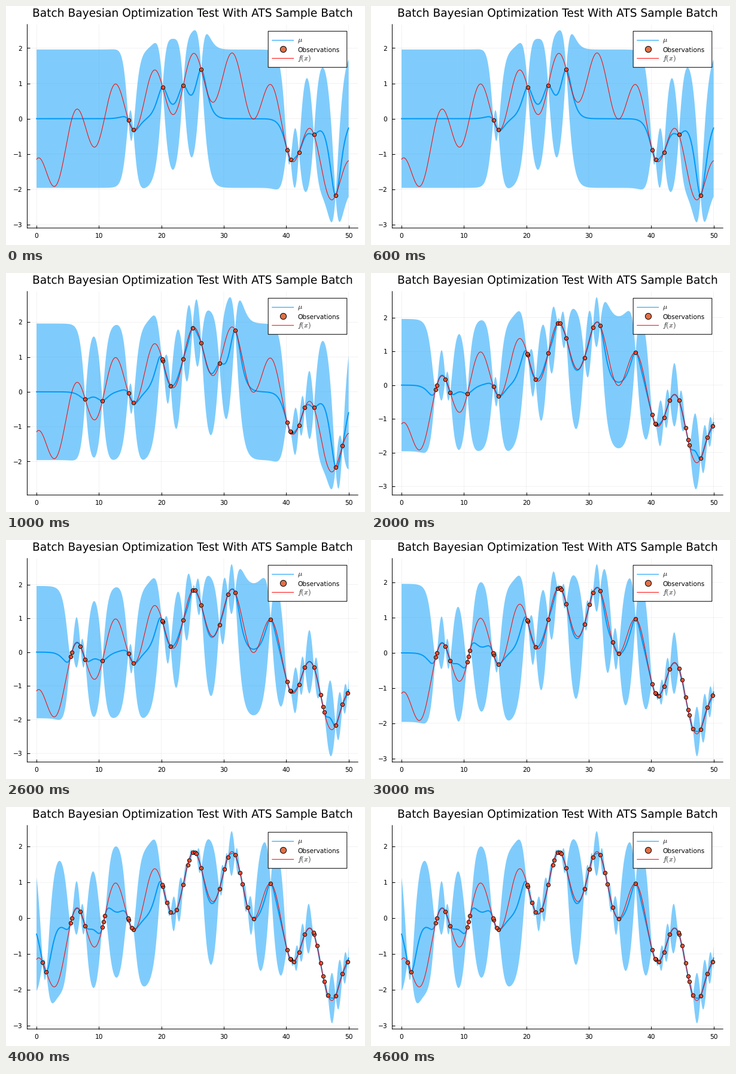
Animation, 600 px wide and 400 px high, one loop 5 s. Source, as a matplotlib script:

```python
import numpy as np
import matplotlib.pyplot as plt
from matplotlib.animation import FuncAnimation
from matplotlib.patches import Rectangle

W, H = 600, 400
PT = 0.72  # points per pixel at 100 dpi
LEFT, RIGHT, TOP, BOTTOM = 35.47, 588.19, 30.87, 371.61
BLUE, ORANGE = "#009AFA", "#E26F46"

plt.rcParams.update({
    "font.family": "DejaVu Sans",
    "font.size": 10.67 * PT,
    "mathtext.fontset": "cm",
    "text.hinting": "none",
})

# Sample locations chosen at each step
BATCHES = [
    [14.72, 15.50, 20.20, 23.50, 26.39, 40.15, 40.70, 42.04, 44.44, 47.92],
    [7.80, 10.55, 20.13, 21.48, 25.00, 29.29, 31.82, 40.65, 42.99, 49.03],
    [5.47, 5.66, 7.03, 25.39, 30.67, 37.51, 45.50, 45.90, 46.09, 49.84],
    [10.74, 10.94, 14.64, 25.58, 30.09, 33.81, 34.77, 41.23, 44.93, 46.69],
    [0.98, 1.57, 15.24, 20.90, 22.44, 24.21, 24.41, 32.61, 33.00, 44.34],
]


def objective(x):
    return (3 * np.sin(np.pi * x / 50) + 0.25 * np.sin(x / 4)
            + 0.75 * np.cos(x) - 1.9)


def matern52(a, b):
    s = np.sqrt(5) * np.abs(a[:, None] - b)
    return (1 + s + s**2 / 3) * np.exp(-s)


def posterior(x, xo, yo):
    gram = matern52(xo, xo) + 1e-6 * np.eye(len(xo))
    cross = matern52(xo, x)
    weights = np.linalg.solve(gram, cross)
    var = 1 - np.sum(cross * weights, axis=0)
    return yo @ weights, np.sqrt(np.clip(var, 0, None))


grid = np.linspace(0, 50, 1001)

fig = plt.figure(figsize=(W / 100, H / 100), dpi=100, facecolor="white")
ax = fig.add_axes([LEFT / W, 1 - BOTTOM / H,
                   (RIGHT - LEFT) / W, (BOTTOM - TOP) / H])
ax.set_xlim(-1.5, 51.5)
ax.set_xticks(range(0, 51, 10))
ax.set_yticks(range(-3, 3))
ax.set_axisbelow(True)
ax.grid(color="black", alpha=0.1, lw=0.5 * PT)
ax.tick_params(direction="in", length=4.72 * PT, width=PT)
ax.tick_params(axis="x", pad=7.5 * PT)
ax.tick_params(axis="y", pad=8 * PT)
ax.spines[["top", "right"]].set_visible(False)
for side in ("left", "bottom"):
    ax.spines[side].set(linewidth=PT, snap=False)
for tick in ax.xaxis.get_major_ticks() + ax.yaxis.get_major_ticks():
    tick.gridline.set_snap(False)
    tick.tick1line.set_snap(False)

# Title and legend in pixel coordinates
page = fig.add_axes([0, 0, 1, 1])
page.set(xlim=(0, W), ylim=(H, 0))
page.axis("off")
page.text((LEFT + RIGHT) / 2, 18, ha="center", fontsize=18.67 * PT,
          s="Batch Bayesian Optimization Test With ATS Sample Batch")

BOX_X, BOX_Y, ROW = 438.2, 42.23, 15.12
page.add_patch(Rectangle((BOX_X, BOX_Y), 131.6, 4 * ROW, fc="white",
                         ec="black", lw=PT, snap=False))
rows = [BOX_Y + ROW * k for k in (1, 2, 3)]
for y, color in ((rows[0], BLUE), (rows[2], "red")):
    page.plot([BOX_X + 6.1, BOX_X + 42.9], [y, y], color=color, lw=PT,
              solid_capstyle="butt", snap=False)
page.plot(BOX_X + 24.5, rows[1], "o", ms=10.2 * PT, mfc=ORANGE, mec="black",
          mew=PT)
for y, text, size, drop in ((rows[0], r"$\mu$", 12, 2.3),
                            (rows[1], "Observations", 10.67, 4),
                            (rows[2], "$f(x)$", 12, 3.5)):
    page.text(BOX_X + 49, y + drop, text, fontsize=size * PT)

# Data layers
band, = ax.fill([0], [0], fc=BLUE, ec="none", alpha=0.5, zorder=1)
mean_line, = ax.plot([], [], color=BLUE, lw=2 * PT, zorder=2)
dots, = ax.plot([], [], "o", ms=6.2 * PT, mfc=ORANGE, mec="black", mew=PT,
                zorder=3)
ax.plot(grid, objective(grid), color="red", lw=PT, zorder=4)


def draw(step):
    xo = np.concatenate(BATCHES[:step + 1])
    yo = objective(xo)
    mu, sd = posterior(grid, xo, yo)
    upper, lower = mu + 1.96 * sd, mu - 1.96 * sd
    band.set_xy(np.column_stack([np.r_[grid, grid[::-1]],
                                 np.r_[upper, lower[::-1]]]))
    mean_line.set_data(grid, mu)
    dots.set_data(xo, yo)

    # Fit the vertical range to the band with a 3 % margin
    lo, hi = lower.min(), upper.max()
    margin = 0.03 * (hi - lo)
    ax.set_ylim(lo - margin, hi + margin)
    return band, mean_line, dots


anim = FuncAnimation(fig, draw, frames=len(BATCHES), interval=1000,
                     repeat=True, repeat_delay=0, blit=False)
plt.show()
```
